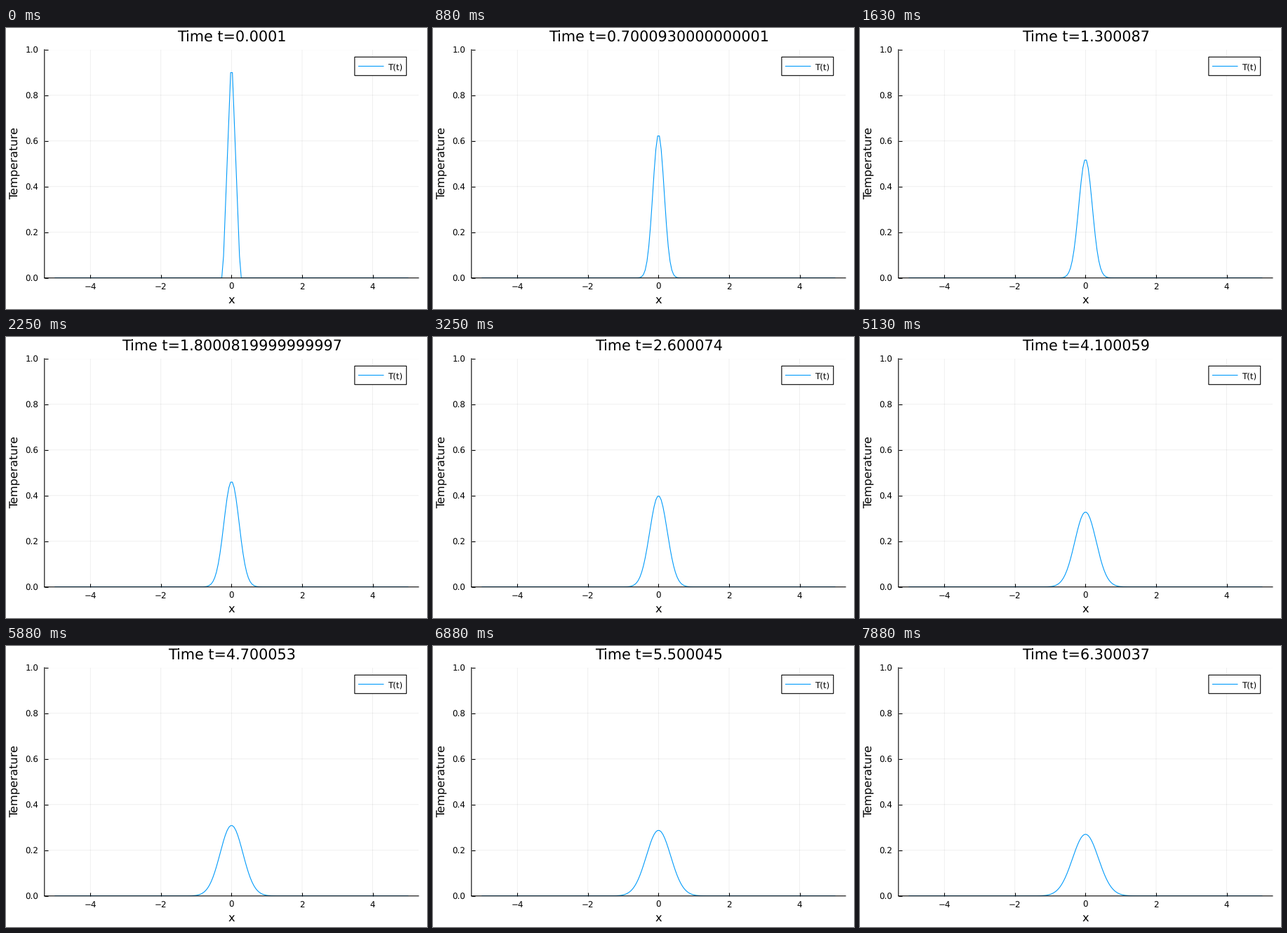
Recreate the animation shown at these times as a matplotlib script. Size 600 by 400 pixels, loop 8 s.

```python
import numpy as np
import matplotlib.pyplot as plt
from matplotlib.animation import FuncAnimation
from matplotlib.patches import Rectangle

W, H, DPI = 600, 400, 100
FRAMES, INTERVAL = 64, 125
LEFT, RIGHT, TOP, BOTTOM = 54.8, 588.0, 30.8, 355.8
BLUE = "#009afa"


def pt(px):
    return px * 72 / DPI


plt.rcParams.update({
    "font.family": "DejaVu Sans",
    "text.hinting": "none",
    "path.snap": False,
    "axes.linewidth": pt(1.1),
    "axes.axisbelow": True,
})

# Heat equation on a fixed grid, solved exactly in time by its eigenmodes
N, DIFFUSIVITY = 200, 0.01
T_START, T_END, STEPS = 0.0001, 10.0, 100
x = np.linspace(-5, 5, N)
laplacian = (np.eye(N, k=1) + np.eye(N, k=-1) - 2 * np.eye(N)) / (x[1] - x[0]) ** 2
rates, modes = np.linalg.eigh(laplacian)
weights = modes.T @ np.maximum(0, 1 - 4 * np.abs(x))


def time_at(i):
    s = i / STEPS
    return (1 - s) * T_START + s * T_END


def temperature(t):
    return modes @ (np.exp(DIFFUSIVITY * rates * (t - T_START)) * weights)


fig = plt.figure(figsize=(W / DPI, H / DPI), dpi=DPI, facecolor="white")


def label(px, py, text, size, **kw):
    kw = {"ha": "center", "va": "baseline", **kw}
    return fig.text(px / W, 1 - py / H, text, fontsize=pt(size), **kw)


ax = fig.add_axes([LEFT / W, 1 - BOTTOM / H, (RIGHT - LEFT) / W, (BOTTOM - TOP) / H])
ax.set(xlim=(-5.3, 5.3), ylim=(0, 1),
       xticks=range(-4, 5, 2), yticks=np.linspace(0, 1, 6))
ax.spines[["top", "right"]].set_visible(False)
ax.grid(color="black", alpha=0.1, linewidth=pt(0.6))
ax.tick_params(direction="in", length=pt(5), width=pt(1.1), labelsize=pt(11.9))
ax.tick_params(axis="x", pad=pt(15.9))
ax.tick_params(axis="y", pad=pt(8.2))
for tick in ax.get_xticklabels():
    tick.set_va("baseline")

title = label(322, 20, "", 20.8)
label(321.7, 391.6, "x", 16.3)
label(18, 192.3, "Temperature", 16.3, rotation=90, rotation_mode="anchor")

# Legend, laid out in pixels
key = fig.add_axes([0, 0, 1, 1], xlim=(0, W), ylim=(H, 0))
key.axis("off")
key.add_patch(Rectangle((496.9, 41.3), 73.8, 26.4, facecolor="white",
                        edgecolor="black", linewidth=pt(1.1)))
key.plot([502, 538.5], [54.4, 54.4], color=BLUE, lw=pt(1.1), solid_capstyle="butt")
label(544, 59, "T(t)", 11.9, ha="left")

curve, = ax.plot(x, temperature(T_START), color=BLUE, lw=pt(1.1))


def update(i):
    t = time_at(i)
    curve.set_ydata(temperature(t))
    title.set_text(f"Time t={t!r}")
    return curve, title


anim = FuncAnimation(fig, update, frames=FRAMES, interval=INTERVAL,
                     repeat=True, repeat_delay=0)
plt.show()
```
